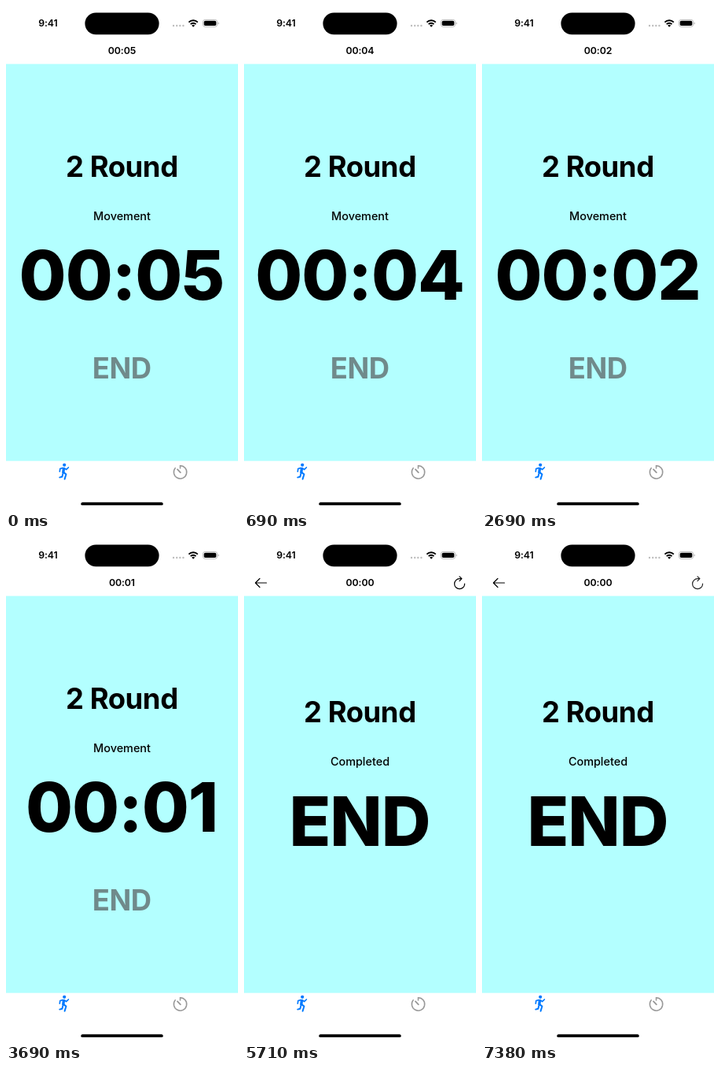
Recreate the animation shown at these times as an HTML page. Size 295x640 px, loop 8 s.

```html
<!DOCTYPE html>
<html lang="en">
<head>
<meta charset="utf-8">
<title>Round timer</title>
<style>
  html, body { margin: 0; width: 100%; height: 100%; overflow: hidden; background: #fff; }
  svg { display: block; width: 100vw; height: 100vh; }
  text {
    font-family: Inter, "Liberation Sans", sans-serif;
    font-optical-sizing: none;
    text-anchor: middle;
  }
  .bar { font-size: 12.3px; font-weight: 600; letter-spacing: -.1px; }
  .head { font-size: 36.4px; font-weight: 700; letter-spacing: -.4px; }
  .label { font-size: 14.4px; font-weight: 500; }
  .big { font-size: 86.8px; font-weight: 800; letter-spacing: -1px; }
  .line { fill: none; stroke: #000; stroke-linecap: round; stroke-linejoin: round; }
</style>
</head>
<body>
<svg viewBox="0 0 295 640">
  <rect width="295" height="640" fill="#fff"/>
  <rect y="73.6" width="295" height="504.1" fill="#b3ffff"/>

  <!-- status bar -->
  <text class="bar" x="53.4" y="26.3">9:41</text>
  <rect x="100.4" y="8.4" width="94.2" height="27.8" rx="13.9"/>
  <g fill="#bdbdbd">
    <circle cx="213" cy="25" r="1.2"/><circle cx="217.2" cy="25" r="1.2"/>
    <circle cx="221.3" cy="25" r="1.2"/><circle cx="225.4" cy="25" r="1.2"/>
  </g>
  <g class="line" style="stroke-width:1.9;stroke-linecap:butt">
    <path d="M232.4 20.6a8 8 0 0 1 11.4 0"/>
    <path d="M234.7 23.1a4.8 4.8 0 0 1 6.8 0"/>
  </g>
  <path d="M238.1 26.8l-2-2.1a2.9 2.9 0 0 1 4 0z"/>
  <rect x="250.4" y="17.4" width="18.2" height="9" rx="2.9" fill="none" stroke="#aaa" stroke-width=".8"/>
  <rect x="251.7" y="18.7" width="15.6" height="6.4" rx="1.8"/>
  <path d="M269.7 20.4a1.6 1.6 0 0 1 0 3z" fill="#aaa"/>

  <!-- navigation bar -->
  <text class="bar" id="clock" x="147.5" y="61.1"></text>
  <g id="nav">
    <path class="line" stroke-width="1.2" d="M28.6 57H14.6M20 51.5L14.5 57L20 62.5"/>
    <path class="line" id="reload" stroke-width="1.2" d="M280.6 58.2a6.5 6.5 0 1 1-6.5-6.5h2.6M274 48.8l2.9 2.9l-2.9 2.9"/>
  </g>

  <!-- content -->
  <g id="main">
    <text class="head" x="147.3" y="217">2 Round</text>
    <text class="label" id="label" x="147.5" y="272"></text>
    <text class="big" id="big" x="147" y="373.3"></text>
  </g>
  <text class="head" id="stop" x="147.3" y="473" fill="#708a8b">END</text>

  <!-- tab bar -->
  <g fill="none" stroke="#007aff" stroke-linecap="round" stroke-linejoin="round">
    <circle cx="74.2" cy="582.8" r="2.1" fill="#007aff" stroke="none"/>
    <path stroke-width="3.4" d="M73.4 587.6L72.8 592.4"/>
    <path stroke-width="1.7" d="M72.4 586.5L68.8 587.6L68.3 591.2M74.4 586.8L76.6 588.6L79.4 586"/>
    <path stroke-width="2" d="M73.4 592.4L76.4 594.6L74.6 600.8M72.2 594.4L71.4 597.8L68.2 598.6"/>
  </g>
  <g fill="none" stroke="#999" stroke-width="1.5" stroke-linecap="round">
    <path d="M221.5 587V583.7A8.2 8.2 0 1 1 215.2 586.7"/>
    <path stroke-width="1.9" d="M218 588.4L221.8 592.3"/>
  </g>
  <rect x="95.3" y="630.3" width="104.4" height="3.8" rx="1.9"/>
</svg>
<script>
const LOOP = 8000;
// start time, seconds left, or -1 once the round is over
const steps = [[0, 5], [690, 4], [1690, 3], [2690, 2], [3690, 1], [4700, 0], [5710, -1]];
const el = id => document.getElementById(id);
const show = (id, on) => { el(id).style.display = on ? "" : "none"; };
let shown;

function render(left) {
  const done = left < 0;
  const time = "00:0" + Math.max(left, 0);
  el("clock").textContent = time;
  el("label").textContent = done ? "Completed" : "Movement";
  el("big").textContent = done ? "END" : time;
  el("main").setAttribute("transform", `translate(0 ${done ? 17.3 : 0})`);
  show("nav", done);
  show("stop", !done);
}

function tick() {
  const t = performance.now() % LOOP;
  const left = steps.findLast(s => s[0] <= t)[1];
  if (left !== shown) render(shown = left);
  el("reload").style.opacity = t >= 7380 ? .85 : 1;
  requestAnimationFrame(tick);
}
tick();
</script>
</body>
</html>
```
